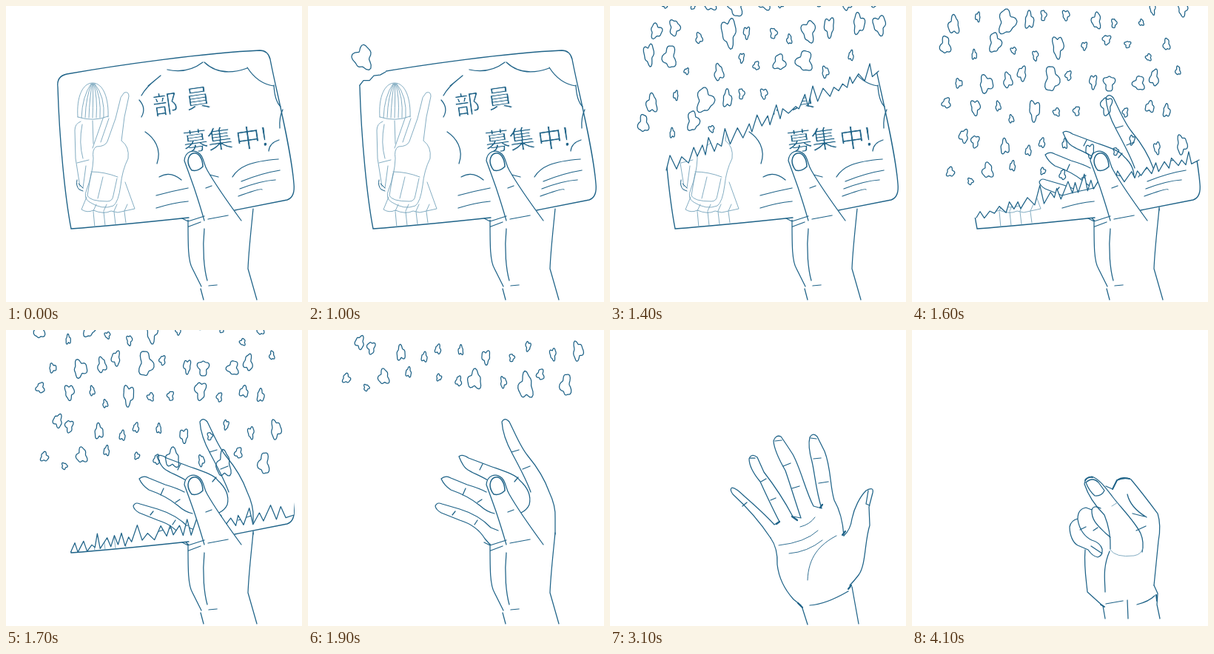
An HTML page with a canvas that plays this animation: 400x400 px, repeating every 7100 ms.

```html
<!DOCTYPE html>
<html lang="ja">
<head>
<meta charset="utf-8">
<title>部員募集中!</title>
<style>
html, body { margin: 0; width: 100%; height: 100%; overflow: hidden; background: #fff; }
canvas { display: block; width: 100vw; height: 100vh; }
</style>
</head>
<body>
<canvas id="stage" width="400" height="400"></canvas>
<script>
const ctx = document.getElementById('stage').getContext('2d');
const INK = '#1f6388', SOFT = '#6598b3', LOOP = 7100, RISE = 0.53;
ctx.lineCap = ctx.lineJoin = 'round';

const card = {
  rim: 'M247 286C200 291 130 298 88 301C80 260 72 180 70 110Q68 95 82 92C150 80 270 63 343 60Q354 60 357 72C364 110 385 190 389 240Q391 258 380 262C350 268 330 272 309 276',
  burst: 'M180 127Q190 138 183 150M183 121Q189 110 203 99M218 86Q245 92 266 76M192 108L209 94M268 76Q290 97 326 84M326 83Q340 105 362 108M362 107Q363 128 371 136M374 140Q369 150 370 165M369 181Q356 185 355 196M306 231C314 218 328 210 368 207M188 170C200 178 211 193 204 213M207 231Q222 222 237 235M275 228L287 231'
};

const girl = {
  hair: 'M97 150C95 122 104 104 117 104C132 104 139 126 138 150M97 150Q118 157 138 149',
  body: 'M101 156Q93 159 93 168L94 206L100 244M117 155L118 186M96 212L112 208M108 216L104 246M103 160Q98 185 104 206M131 152L117 192M139 152L128 184',
  bag: 'M160 117Q166 115 166 122L160 150L156 182Q167 190 165 206Q157 222 155 242Q152 265 145 270Q130 276 113 265Q104 260 109 248Q117 228 118 206Q116 194 122 190Q134 190 137 183L148 152L155 124Z',
  pocket: 'M115 224Q133 224 151 231M115 226L110 256Q113 264 137 264Q144 264 145 256L150 233M131 231L124 260',
  skirt: 'M109 258L102 275Q110 280 118 276Q132 282 142 277L151 279L174 274L161 238'
};

const hand = {
  thumb: 'M268 290C264 276 259 260 254 245Q248 228 241 209C242 197 253 192 262 200C268 206 267 214 272 222C280 236 296 260 318 290',
  nail: 'M246 209C247 199 256 195 262 203Q266 209 266 217Q259 224 251 222Q246 216 246 209Z',
  wrist: 'M246 289C246 325 246 345 252 355L264 379M268 301C265 330 268 357 272 371M263 382L267 397M334 274C331 305 328 330 327 355L339 397M247 298L263 292M238 287L246 291L268 284M273 288L300 283M274 378L285 377M270 246L278 243'
};
const fingers = [
  'M301 219C295 202 286 186 276 167C270 156 263 142 262 124Q266 117 272 124C281 142 287 158 297 170C312 188 320 202 326 219Q335 238 334 254L334 276M275 165L285 162M290 188L300 184',
  'M243 203C231 196 222 193 216 189Q210 186 204 171Q208 167 217 173L241 182C262 190 281 195 286 203C297 213 302 224 299 236Q296 243 288 247M279 205L284 199M232 189L236 181',
  'M241 219Q232 214 215 209L193 200Q186 196 180 201Q184 210 193 216Q216 224 232 237Q242 246 252 248M209 223L213 214M229 233L235 229',
  'M257 271L247 267Q231 250 205 242L181 235Q174 232 172 238Q173 243 180 247L205 257Q228 264 239 282L246 290M195 250L199 245M225 263L229 257'
];

const palm = {
  fingers: 'M217 281C207 266 188 242 166 222Q161 215 165 213Q170 213 182 225C198 239 211 251 222 263L229 259C219 240 210 220 203 205Q188 187 188 174Q191 166 199 172L208 192C222 210 238 235 247 252L258 254C252 237 244 210 237 190Q222 164 221 150Q224 141 231 144Q238 154 247 168C258 188 264 217 275 238L286 241C278 216 277 195 273 178Q267 157 270 145Q274 138 280 144L290 164C299 187 297 211 303 230Q314 249 316 278',
  base: 'M316 278Q325 270 327 255C330 240 338 225 346 217Q357 211 355 220L350 239L351 264C344 285 346 318 336 331Q329 340 324 345M349 217L346 235L351 237M217 281Q227 295 226 317Q229 343 248 364L258 372M260 376L267 398M327 347L336 397M270 372Q291 371 322 353',
  joints: 'M179 238L185 233M204 205L211 201M217 230L224 227M234 184L244 180M246 214L256 211M275 174L285 173M282 207L295 205M189 173L196 173M223 150L232 149M271 146L279 147',
  creases: 'M228 291Q264 287 281 271M242 302Q267 300 287 284M306 278C283 290 268 307 267 338M257 266Q270 263 277 253',
  folds: 'M225 262L229 259M246 252L253 257M284 240L287 236M314 277L318 272M254 369L260 375M322 350L326 345'
};

const fist = {
  thumb: 'M268 296Q269 272 260 250Q240 230 233 208Q234 199 243 198C253 201 263 215 270 224C281 239 301 258 309 275Q314 287 311 300M235 206Q244 198 252 206L260 217Q256 225 247 224Q239 217 235 206',
  index: 'M262 211L271 215L277 203Q285 197 296 202C306 214 320 232 332 248Q337 264 333 285L327 345M291 222Q295 240 317 253M303 271L316 265M298 248L314 252',
  curled: 'M213 266Q215 257 224 255Q224 242 235 240L243 243Q245 236 255 241M213 266C213 278 218 288 224 291L238 297Q244 306 251 307Q258 305 257 296M224 256C226 270 234 280 243 284Q254 287 257 296M243 243C242 258 253 266 262 275L268 280M227 270L235 266M245 271L251 267M242 292L257 302',
  wrist: 'M234 297C232 320 236 342 237 354L258 373L261 390M267 299C257 322 261 340 261 354M327 345L332 356L331 371L335 390M291 365L292 390M262 370L285 366M304 371Q320 367 328 359',
  heel: 'M268 297Q275 308 300 305Q311 303 312 294M270 238L278 233',
  folds: 'M234 203Q237 198 244 199M271 215L277 203Q285 199 294 201M255 371L260 374M330 358L331 366'
};

// Ends of the torn edge at each step
const tears = {
  1000: [70, 107, 105, 89],
  1200: [71, 138, 250, 69],
  1300: [74, 182, 338, 62],
  1400: [76, 222, 363, 88],
  1500: [83, 262, 376, 148],
  1600: [87, 286, 388, 208],
  1700: [88, 299, 389, 250]
};

function line(d, width = 1.25, color = INK) {
  ctx.lineWidth = width;
  ctx.strokeStyle = color;
  ctx.stroke(new Path2D(d));
}

function rng(seed) {
  return () => {
    seed = seed * 16807 % 2147483647;
    return seed / 2147483647;
  };
}

function tear(t) {
  if (!tears[t]) return null;
  const [x0, y0, x1, y1] = tears[t], rnd = rng(t * 7919), pts = [[x0, y0]];
  const size = Math.min(1, (x1 - x0) / 200);
  let up = true;
  for (let x = x0 + 5; x < x1 - 4; x += 3 + rnd() * 7, up = !up) {
    const base = y0 + (y1 - y0) * (x - x0) / (x1 - x0);
    pts.push([x, base + size * (up ? -4 - rnd() * 18 : rnd() * 5)]);
  }
  return [...pts, [x1, y1]];
}

// One field of flakes that rises as a whole; y is the height at 1400 ms
function makeFlakes() {
  const rnd = rng(48271), list = [{ x: 74, y: -142, w: 27, h: 34, seed: 5 }];
  for (let row = 0; row < 11; row++) {
    for (let col = 0; col < 11; col++) {
      const w = 7 + 17 * rnd() ** 1.6;
      list.push({
        x: 50 + col * 30 + (row % 2) * 13 + (rnd() - 0.5) * 16,
        y: -95 + row * 43 + (rnd() - 0.5) * 26,
        w, h: w * (1.15 + rnd() * 0.9), seed: rnd() * 6.28
      });
    }
  }
  return list;
}
const flakes = makeFlakes();

function drawFlake({ x, w, h, seed }, y) {
  ctx.beginPath();
  for (let a = 0; a < 6.28; a += 0.2) {
    const r = 0.44 + 0.09 * Math.sin(3 * a + seed) + 0.06 * Math.sin(5 * a + seed * 7);
    ctx.lineTo(x + w * r * Math.cos(a), y + h * r * Math.sin(a));
  }
  ctx.closePath();
  ctx.lineWidth = 1.25;
  ctx.strokeStyle = INK;
  ctx.stroke();
}

function drawFlakes(t) {
  const ends = tears[t];
  for (const f of flakes) {
    const y = f.y - (t - 1400) * RISE;
    if (ends) {
      const [x0, y0, x1, y1] = ends;
      const limit = y0 + (y1 - y0) * (f.x - x0) / (x1 - x0);
      if (f.x > x1 + 5 || y + f.h / 2 > limit - 12) continue;
    }
    drawFlake(f, y);
  }
}

function letter(char, x, y) {
  ctx.save();
  ctx.translate(x, y);
  ctx.rotate(-0.14);
  ctx.font = '400 34px "Noto Sans CJK JP", "Noto Sans CJK", sans-serif';
  ctx.textAlign = 'center';
  ctx.textBaseline = 'middle';
  ctx.fillStyle = INK;
  ctx.fillText(char, 0, 0);
  // A white outline thins the strokes to pen weight
  ctx.strokeStyle = '#fff';
  ctx.lineWidth = 0.8;
  ctx.strokeText(char, 0, 0);
  ctx.restore();
}

function drawGirl() {
  Object.values(girl).forEach(d => line(d, 0.8, SOFT));
  for (let i = 0; i < 7; i++) {
    const x = 102 + i * 5;
    line(`M${115 + i * 0.8} 105Q${x + (i < 4 ? 1 : 2)} 122 ${x} 151`, 0.8, SOFT);
  }
  for (let i = 0; i < 4; i++) {
    const x = 118 + i * 14;
    line(`M${x} 278L${x + 2} ${299 - i * 2}M${x + 4} 268L${x} 277`, 0.8, SOFT);
  }
  line('M96 235Q94 243 99 248L104 250M98 240L104 246', 1);
}

function drawCard(t) {
  const edge = tear(t), torn = new Path2D();
  ctx.save();
  if (edge) {
    edge.forEach(p => torn.lineTo(...p));
    const below = new Path2D(torn);
    below.lineTo(edge[edge.length - 1][0], 0);
    [[400, 0], [400, 400], [0, 400], [0, edge[0][1]]].forEach(p => below.lineTo(...p));
    ctx.clip(below);
  }
  ctx.fillStyle = '#fff';
  ctx.fill(new Path2D(card.rim));
  letter('部', 215, 132);
  letter('員', 259, 124);
  letter('募', 256, 182);
  letter('集', 289, 179);
  letter('中', 327, 178);
  letter('!', 349, 176);
  line(card.rim, 1.35);
  line(card.burst);
  for (let i = 0; i < 3; i++) line(`M${318 - i * 2} ${237 + i * 10}Q345 ${226 + i * 10} ${370 - i * i * 6} ${222 + i * 13}`);
  for (let i = 0; i < 2; i++) line(`M203 ${256 + i * 17}Q225 ${250 + i * 16} 246 ${246 + i * 18}`);
  drawGirl();
  ctx.restore();
  ctx.lineWidth = 1.25;
  ctx.strokeStyle = INK;
  ctx.stroke(torn);
}

function drawHolding(t) {
  if (t >= 1500) fingers.forEach(d => line(d));
  if (t < 1800) drawCard(t);
  ctx.fillStyle = '#fff';
  ctx.fill(new Path2D(hand.thumb));
  line(hand.thumb);
  line(hand.nail, 1.5);
  line(hand.wrist);
  if (t >= 1000 && t < 2100) drawFlakes(t);
}

function drawPalm() {
  line(palm.fingers);
  line(palm.base);
  line(palm.joints);
  line(palm.creases, 0.9);
  line(palm.folds, 2.2);
}

function drawFist() {
  [fist.thumb, fist.index, fist.curled, fist.wrist].forEach(d => line(d));
  line(fist.heel, 0.8, SOFT);
  line(fist.folds, 1.9);
}

function poseTime(t) {
  if (t < 1000) return 0;
  if (t < 1200) return 1000;
  if (t < 2100) return Math.floor(t / 100) * 100;
  return t < 3100 ? 2100 : t < 4100 ? 3100 : 4100;
}

let shown = -1;
function tick() {
  const t = poseTime(performance.now() % LOOP);
  if (t !== shown) {
    shown = t;
    ctx.fillStyle = '#fff';
    ctx.fillRect(0, 0, 400, 400);
    if (t < 3100) drawHolding(t);
    else if (t < 4100) drawPalm();
    else drawFist();
  }
  requestAnimationFrame(tick);
}
tick();
</script>
</body>
</html>
```
